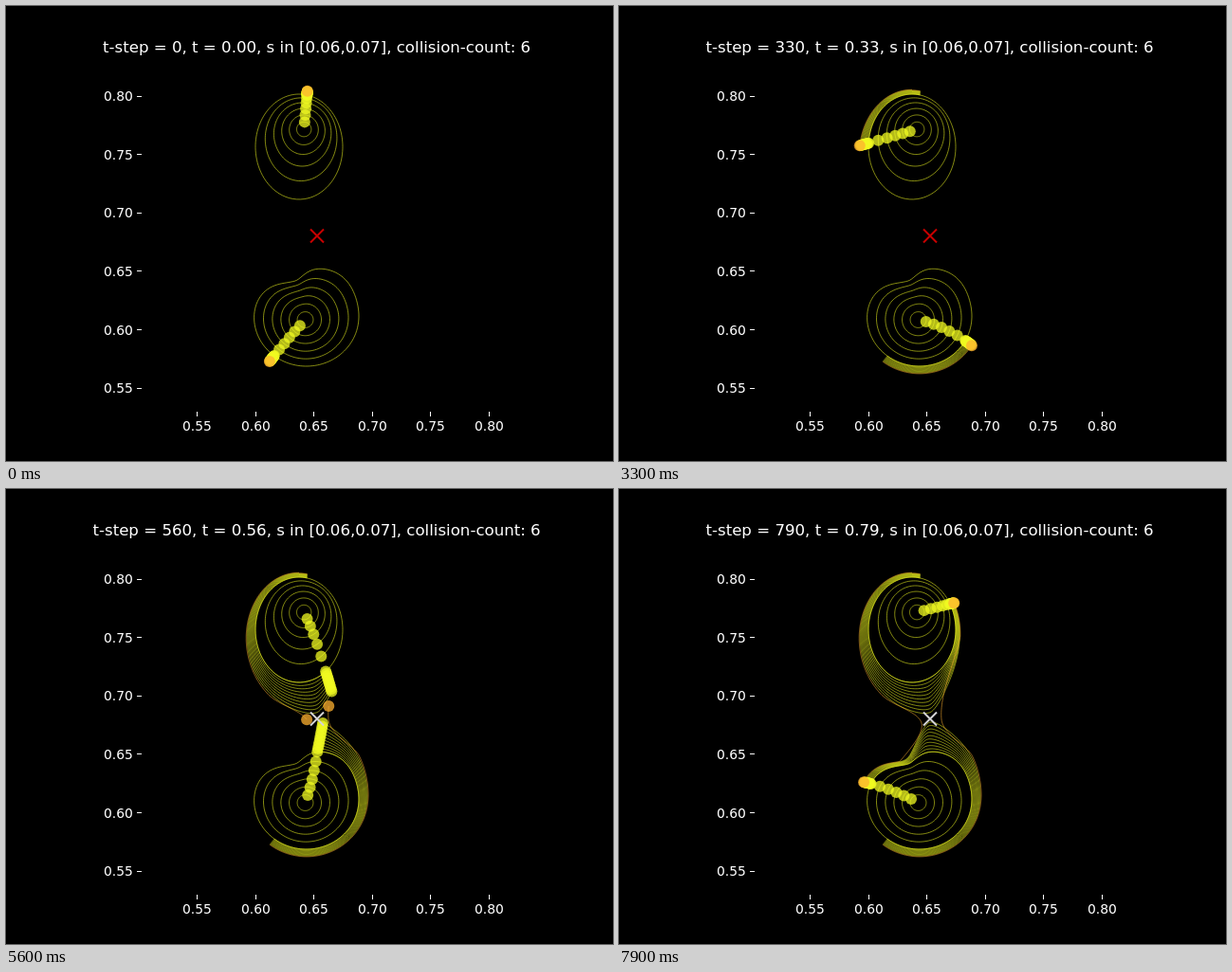
Animation, 640 px wide and 480 px high, one loop 8 s. Source, as an HTML page:

```html
<!DOCTYPE html>
<html lang="en">
<head>
<meta charset="utf-8">
<title>Orbits near a saddle</title>
<style>
  html, body { margin: 0; width: 100%; height: 100%; overflow: hidden; background: #000; }
  svg { display: block; width: 640px; height: 480px; }
  text { fill: #fff; font-family: "DejaVu Sans", sans-serif; font-size: 13.89px; }
  #title { font-size: 16.62px; text-anchor: middle; }
  .tick { fill: #fff; shape-rendering: crispEdges; }
  .line { fill: none; stroke-width: 0.75; stroke-opacity: 0.74; }
  .dot { fill-opacity: 0.75; }
  #saddle { fill: none; stroke-width: 2; }
</style>
</head>
<body>
<svg viewBox="0 0 640 480">
  <g id="axes"></g>
  <g id="lines"></g>
  <g id="dots"></g>
  <path id="saddle" d="M321 235.5l14 14m0-14l-14 14"/>
  <text id="title" x="327.6" y="49"></text>
</svg>
<script>
const LOOP = 8000, STEP = 100, FINE = 0.02;
const YELLOW = '#f0f921', ORANGE = '#fdb02f';
const STRANDS = 10;           // the last strand crosses at the saddle
const LEAVE = 4.8, JOIN = 6.5; // seconds
const TURN = 0.795;           // radians per second

const { sin, cos, exp, hypot, sqrt, round, PI } = Math;
const $ = id => document.getElementById(id);
const mix = (a, b, f) => a + (b - a) * f;
const bell = x => exp(-x * x);

// Signed distance between two angles, -180 to 180.
const turn = (deg, at) => ((deg - at + 180) % 360 + 360) % 360 - 180;

// A hump and a rounded peak over the angle, with a different width on each side.
function hump(deg, at, before, after) {
  const d = turn(deg, at);
  return bell(d / (d < 0 ? before : after));
}
function peak(deg, at, before, after) {
  const d = turn(deg, at), soft = 4;
  return exp((soft - hypot(d, soft)) / (d < 0 ? before : after));
}

// Each lobe: center, ring spacing, oval around level 6, gap to level 7,
// angle of the innermost dot and lead of the outermost one over time.
const upper = {
  x: 314.2, y: 130, core: 7.7, dent: 0,
  oval: { dx: -5.2, dy: -18.5, a: 46, b: 55.5 },
  gap: deg => 4.2 + 34.5 * peak(deg, 277, 42, 16),
  angle: t => 85 + 36.6 * t - 9 * sin(TURN * t) - 2.5 * (1 - cos(TURN * t)),
  lead: t => 8 * sin(TURN * t / 2) - 23 * bell((t - 4.6) / 1.3),
  neck: [5.7, 319, 247]
};
const lower = {
  x: 315.5, y: 331, core: 8.4, dent: 12.5,
  oval: { dx: 1.2, dy: 3, a: 55.2, b: 52 },
  gap: deg => 7.8 + 29.5 * peak(deg, 82, 28, 8),
  angle: t => -132 + 36 * t - 2 * sin(TURN * t),
  lead: t => -1.5 - 12 * sin(0.73 * (t - 0.35)),
  neck: [5.42, 340, 243]
};
const lobes = [upper, lower];

// Distance from the lobe center to its oval.
function ovalRadius({ dx, dy, a, b }, deg) {
  const c = cos(deg * PI / 180) / a, s = sin(deg * PI / 180) / b;
  const u = dx / a, v = dy / b;
  const q = c * c + s * s, p = c * u + s * v;
  return (p + sqrt(p * p - q * (u * u + v * v - 1))) / q;
}

function polar(lobe, level, deg) {
  const dip = lobe.dent * hump(deg, 105, 19, 33);
  const six = ovalRadius(lobe.oval, deg) - dip + 0.28 * lobe.dent * hump(deg, 50, 25, 25);
  const r = level <= 6
    ? lobe.core * level + (six - lobe.core * 6) * (level / 6) ** 3
    : six + (lobe.gap(deg) - 0.35 * dip) * (level - 6);
  const a = deg * PI / 180;
  return [lobe.x + r * cos(a), lobe.y - r * sin(a)];
}

const orbit = (lobe, level, t) =>
  polar(lobe, level, lobe.angle(t) + lobe.lead(t) * (level - 1) / 6);

// Smooth curve through inner keys [time, x, y]; the end keys only set slopes.
function through(keys, t) {
  let i = 1;
  while (i < keys.length - 3 && t > keys[i + 1][0]) i++;
  const h = keys[i + 1][0] - keys[i][0];
  const f = (t - keys[i][0]) / h, g = 1 - f;
  return [1, 2].map(c => {
    const slope = j => h * (keys[j + 1][c] - keys[j - 1][c]) / (keys[j + 1][0] - keys[j - 1][0]);
    return keys[i][c] * g * g * (1 + 2 * f) + keys[i + 1][c] * f * f * (3 - 2 * f)
      + slope(i) * f * g * g - slope(i + 1) * f * f * g;
  });
}

// The outermost strand leaves its lobe and continues in the other one.
function crossing(from, to) {
  const key = (lobe, t) => [t, ...orbit(lobe, 7, t)];
  const keys = [key(from, LEAVE - 0.4), key(from, LEAVE), from.neck, key(to, JOIN), key(to, JOIN + 0.4)];
  return t => t < LEAVE ? orbit(from, 7, t) : t > JOIN ? orbit(to, 7, t) : through(keys, t);
}

function add(parent, tag, attrs, text) {
  const el = document.createElementNS('http://www.w3.org/2000/svg', tag);
  for (const k in attrs) el.setAttribute(k, attrs[k]);
  if (text) el.textContent = text;
  return $(parent).appendChild(el);
}

const point = p => p[0].toFixed(2) + ' ' + p[1].toFixed(2);

for (let i = 0; i < 6; i++) {
  const label = (0.55 + i * 0.05).toFixed(2);
  const x = 201.3 + i * 61.58, y = 402.9 - i * 61.58;
  add('axes', 'rect', { class: 'tick', x: round(x - 0.3), y: 428, width: 1, height: 5 });
  add('axes', 'rect', { class: 'tick', x: 138, y: round(y - 0.4), width: 5, height: 1 });
  add('axes', 'text', { x: round(x - 15.3), y: 448 }, label);
  add('axes', 'text', { x: 103, y: round(y + 5.25) }, label);
}

const movers = [];

function addMover(place, color, trail) {
  const m = { place, dot: add('dots', 'circle', { class: 'dot', r: 6, fill: color }) };
  if (trail) {
    m.line = add('lines', 'path', { class: 'line', stroke: color });
    m.points = [];
    for (let i = 0; i * FINE < LOOP / 1000; i++) m.points.push(point(place(i * FINE)));
  }
  movers.push(m);
}

for (const lobe of lobes) {
  for (let level = 1; level <= 6; level++) {
    const pts = [];
    for (let deg = 0; deg < 360; deg += 3) pts.push(point(polar(lobe, level, deg)));
    add('lines', 'path', { class: 'line', stroke: YELLOW, d: 'M' + pts.join('L') + 'Z' });
    if (level < 6) addMover(t => orbit(lobe, level, t), YELLOW, false);
  }
  for (let j = 0; j < STRANDS; j++) {
    addMover(t => orbit(lobe, 6 + j / STRANDS, t), YELLOW, true);
  }
}
addMover(crossing(upper, lower), ORANGE, true);
addMover(crossing(lower, upper), ORANGE, true);

let shown = -1;

function draw(now) {
  const k = Math.floor(now % LOOP / STEP);
  if (k === shown) return;
  shown = k;
  const t = k * STEP / 1000;
  const count = round(t / FINE) + 1;
  for (const m of movers) {
    const [x, y] = m.place(t);
    m.dot.setAttribute('cx', x);
    m.dot.setAttribute('cy', y);
    if (m.line) m.line.setAttribute('d', 'M' + m.points.slice(0, count).join('L'));
  }
  $('saddle').setAttribute('stroke', t < 5.5 ? '#c80000' : '#d4d4d4');
  $('title').textContent =
    `t-step = ${k * 10}, t = ${(k / 100).toFixed(2)}, s in [0.06,0.07], collision-count: 6`;
}

const start = performance.now();
function tick() {
  draw(performance.now() - start);
  requestAnimationFrame(tick);
}
tick();
</script>
</body>
</html>
```
